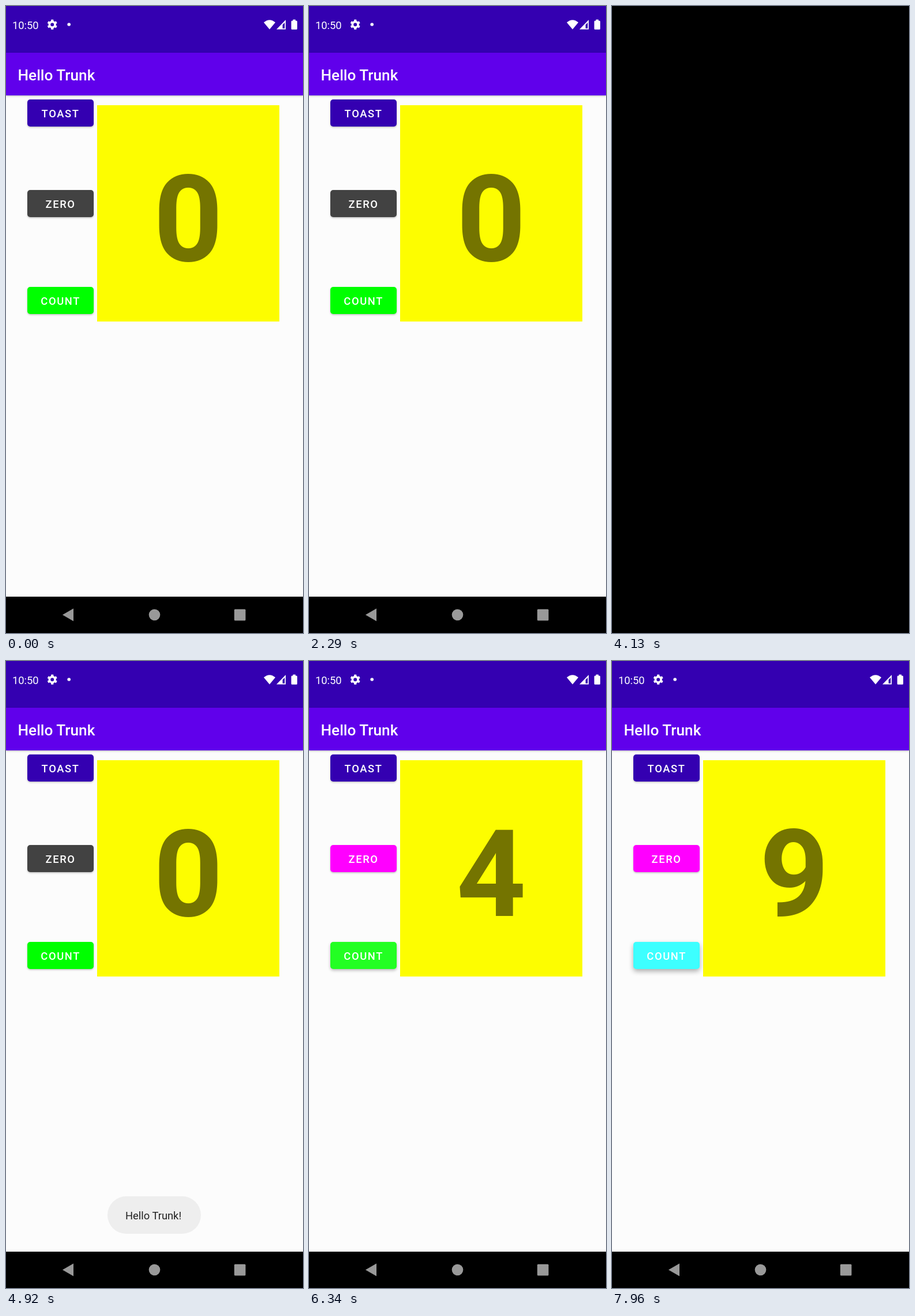
These frames come from a looping animation (515x1087 px, 8 s). An HTML page:

```html
<!DOCTYPE html>
<html lang="en">
<head>
<meta charset="utf-8">
<title>Counter</title>
<style>
html, body { margin: 0; width: 100%; height: 100%; overflow: hidden; background: #000; }
#stage { position: relative; width: 515px; height: 1087px; overflow: hidden; background: #fcfcfc; font-family: Roboto, sans-serif; }
#stage > * { position: absolute; }
#status { left: 0; top: 0; width: 515px; height: 81px; background: #3400b1; }
#bar { left: 0; top: 81px; width: 515px; height: 74px; background: #6000eb; box-shadow: 0 1px 3px rgba(0,0,0,.28); }
#nav { left: 0; top: 1024px; width: 515px; height: 63px; background: #000; }
#panel { left: 158px; top: 172px; width: 316px; height: 375px; background: #fdfd00; }
.btn { left: 37px; width: 115px; height: 47.3px; border-radius: 5px; }
#toastBtn { top: 162px; background-color: #3400b1; }
#zeroBtn { top: 319px; }
#countBtn { top: 487px; }
#note { left: 176px; top: 928px; width: 162px; height: 65px; border-radius: 32.5px; background: #eee; }
svg { left: 0; top: 0; }
.label { font-size: 18.35px; font-weight: 500; letter-spacing: 1.64px; }
#digit { font-size: 210px; font-weight: 700; text-anchor: middle; fill: #747400; }
#dark { inset: 0; background: #000; }
</style>
</head>
<body>
<div id="stage">
  <div id="status"></div>
  <div id="bar"></div>
  <div id="panel"></div>
  <div id="toastBtn" class="btn"></div>
  <div id="zeroBtn" class="btn"></div>
  <div id="countBtn" class="btn"></div>
  <div id="note"></div>
  <div id="nav"></div>
  <svg width="515" height="1087" fill="#fff">
    <text x="11" y="39.7" font-size="18.35">10:50</text>
    <g id="gear" transform="translate(80.2 32.2)">
      <circle r="4.8" fill="none" stroke="#fff" stroke-width="3.6"/>
    </g>
    <circle cx="109.2" cy="32" r="2.8"/>
    <path d="M447 28.5Q457 20 467 28.5L457 40.5Z"/>
    <path fill-rule="evenodd" d="M485 24V40.5H469ZM483.3 28.7L479.6 32.4V38.8H483.3Z"/>
    <path d="M497.5 25.5V23.6H502V25.5H503.6Q505 25.5 505 27V39.2Q505 40.7 503.6 40.7H496Q494.6 40.7 494.6 39.2V27Q494.6 25.5 496 25.5Z"/>
    <text x="20.5" y="129" font-size="26.2" font-weight="500">Hello Trunk</text>
    <g class="label">
      <text x="61.6" y="193">TOAST</text>
      <text x="68.5" y="350">ZERO</text>
      <text x="60.3" y="518">COUNT</text>
    </g>
    <text id="digit" x="316" y="441.7">0</text>
    <text id="noteText" x="207" y="968" font-size="18.35" fill="#222">Hello Trunk!</text>
    <g fill="#999">
      <path d="M98 1055.5L117 1044.5V1066.5Z"/>
      <circle cx="257.5" cy="1055.5" r="9.8"/>
      <rect x="395.8" y="1045.8" width="19.6" height="19.6" rx="1.5"/>
    </g>
  </svg>
  <div id="dark"></div>
</div>
<script>
const LOOP = 8000, HOLD = 130;
const $ = id => document.getElementById(id);
const clamp = v => Math.min(1, Math.max(0, v));
const ramp = (t, start, length) => clamp((t - start) / length);
const mix = (a, b, p) => a + (b - a) * p;

for (let i = 0; i < 6; i++) {
  const tooth = document.createElementNS('http://www.w3.org/2000/svg', 'rect');
  const at = { x: -2.1, y: -8.6, width: 4.2, height: 3.6, rx: .6, transform: `rotate(${i * 60})` };
  for (const key in at) tooth.setAttribute(key, at[key]);
  $('gear').append(tooth);
}

const press = (start, hold = HOLD) => ({ start, end: start + hold });
const toastTaps = [press(3290)];
const countTaps = Array.from({ length: 7 }, (_, i) => press(5172 + i * 293));
countTaps.push(press(7240), press(7550), press(7780, 400));

// Grows from the touch point to cover the button, then fades after release.
function ripple(t, tap) {
  const age = t - tap.start;
  const alpha = .24 * ramp(age, 0, 75) * (1 - ramp(t, Math.max(tap.start + 225, tap.end), 150));
  if (age < 0 || alpha <= 0) return null;
  const e = 1 - (1 - clamp(age / 225)) ** 2;
  const r = mix(34.5, 62.5, e), x = mix(75, 57.5, e);
  const white = `rgba(255,255,255,${alpha.toFixed(3)})`;
  return `radial-gradient(circle at ${x}px 23.6px, ${white} ${r - .5}px, transparent ${r + .5}px)`;
}

function drawButton(el, t, taps) {
  el.style.backgroundImage = taps.map(tap => ripple(t, tap)).filter(Boolean).join(',') || 'none';
  const lift = Math.max(0, ...taps.map(tap =>
    ramp(t, tap.start, 100) * (1 - ramp(t, tap.end + 100, 100))));
  el.style.boxShadow = `0 ${mix(1.5, 4, lift)}px ${mix(3, 9, lift)}px rgba(0,0,0,${mix(.24, .32, lift)})`;
}

function draw(t) {
  const count = countTaps.filter(tap => t >= tap.end).length;
  $('digit').textContent = count;
  $('zeroBtn').style.backgroundColor = count ? '#ff00ff' : '#424242';
  $('countBtn').style.backgroundColor = count % 2 ? '#00ffff' : '#00ff00';
  drawButton($('toastBtn'), t, toastTaps);
  drawButton($('zeroBtn'), t, []);
  drawButton($('countBtn'), t, countTaps);
  const shown = ramp(t, 3640, 160) * (1 - ramp(t, 5700, 180));
  $('note').style.opacity = $('noteText').style.opacity = shown;
  $('dark').style.display = t >= 4130 && t < 4920 ? 'block' : 'none';
}

const began = performance.now();
function tick() {
  draw((performance.now() - began) % LOOP);
  requestAnimationFrame(tick);
}
draw(0);
requestAnimationFrame(tick);
</script>
</body>
</html>
```
